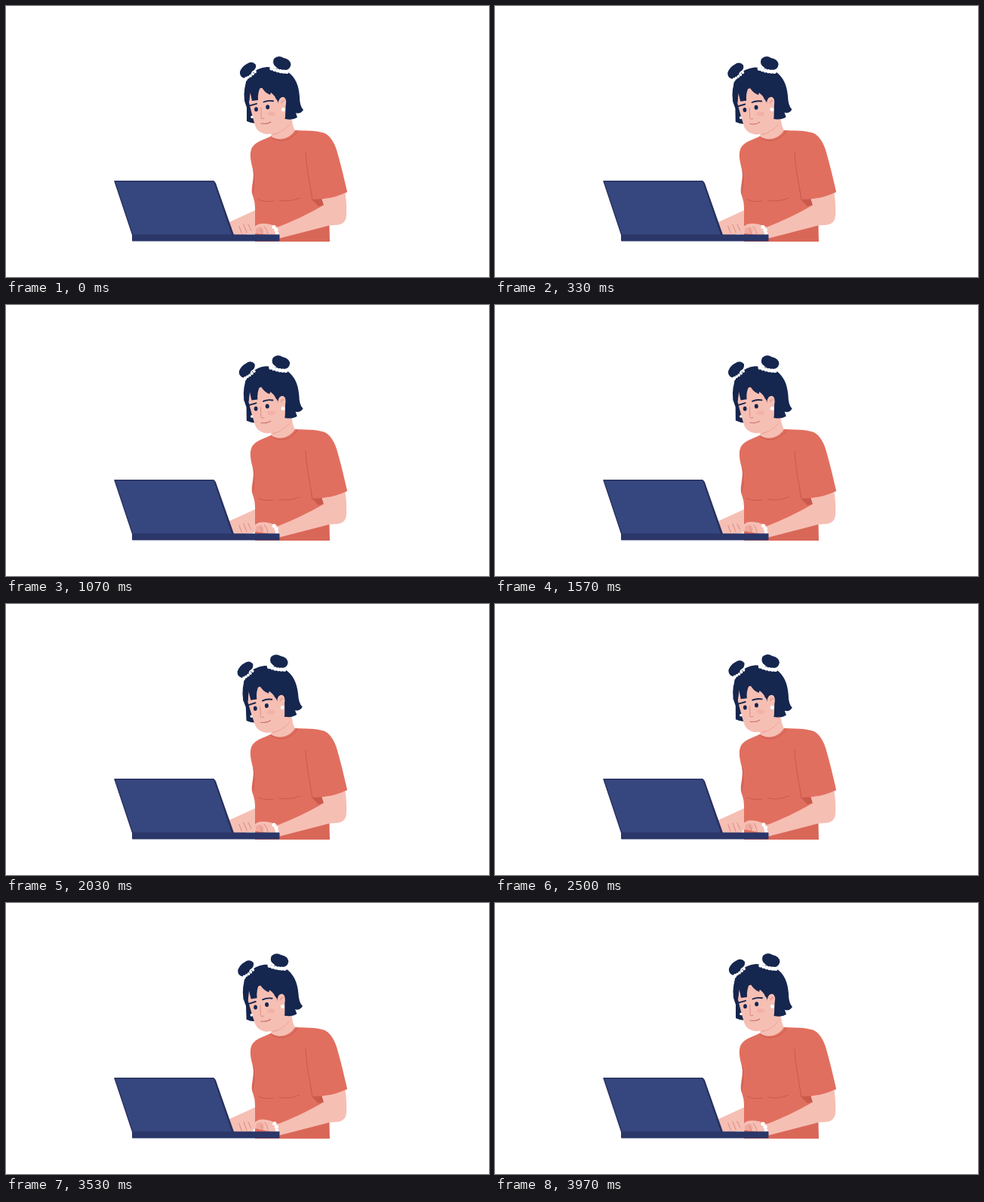
Write an HTML page that moves like this. It is 640 px wide and 360 px high and loops after 4.01 s.

```html
<!DOCTYPE html>
<html lang="en">
<head>
<meta charset="utf-8">
<title>Typing on a laptop</title>
<style>
  html, body { margin: 0; width: 100%; height: 100%; overflow: hidden; background: #fff; }
  svg { display: block; width: 100vw; height: 100vh; }
  .skin { fill: #f6bfb4; }
  .shade { fill: #eda398; }
  .hair { fill: #15264f; }
  .shirt { fill: #e16f5f; }
  .fold { fill: #c95a4c; }
  .white { fill: #fff; }
  .line { fill: none; stroke: #dc8d83; stroke-width: 1; stroke-linecap: round; stroke-linejoin: round; }
  .seam { fill: none; stroke: #c75b4e; stroke-width: 1; stroke-linecap: round; stroke-linejoin: round; }
  .brow { fill: none; stroke: #15264f; stroke-width: 1.9; stroke-linecap: round; }
</style>
</head>
<body>
<svg viewBox="0 0 640 360">
  <!-- far arm -->
  <path class="skin" d="M331 271 L296 287 L300 304 L318 304 L334 293 Z"/>

  <!-- neck and torso -->
  <path class="skin" d="M352 161 L351 174 Q366 186 384 167 Q379 160 378 143 Z"/>
  <path class="shade" d="M353 170 Q368 168 379 152 Q371 167 354 171.5 Z"/>
  <path class="shirt" d="M351 173 C343 177 331 180 326 188 C321 198 326 211 328 221 C328 234 324 243 326.5 251
    Q330 259 330 268 L330 313 L429 313 L428 285 L419 257 Q438 256 452 247 C448 228 443 208 438 191
    Q432 173 421 168.5 C409 165 396 166 383 165 C376 177 361 180 351 173 Z"/>
  <path class="fold" d="M362 308 L429 290 L429 313 L362 313 Z" opacity=".35"/>
  <path class="seam" d="M351 174 C361 183 379 179 386 166"/>
  <path class="seam" d="M334 257 Q343 261 354 259 M362 258 Q376 261 389 255 M328 218 Q330 235 327 248"/>
  <path class="fold" d="M402 232 L405 257 L414 266 L421 264 L418 256 Z"/>

  <!-- far hand -->
  <g id="farHand">
    <path class="skin" d="M299 288 Q313 282 322 288 L328 296 Q329 303 325 304 L300 304 Z"/>
    <path class="line" d="M309 293 L312 302 M315 291 L319 302 M321 291 L325 300"/>
  </g>

  <!-- near arm -->
  <path class="skin" d="M417 250 L449 246 Q452 262 451 279 Q450 291 436 291 Q427 291 419 294 L361 309
    L357 295 Q391 282 421 264.5 Z"/>
  <g id="hand">
    <path class="skin" d="M361 294 Q345 287 334 290 Q325 295 324 302 Q326 305 331 302 L347 304 L361 306 Z"/>
    <path class="shade" d="M331 296 Q337 291 340 295 Q343 299 340 303 L331 302 Z" opacity=".75"/>
    <path class="line" d="M337 296 L340 303 M342 293 Q346 297 347 303"/>
    <g class="white">
      <circle cx="355" cy="293.5" r="2.6"/>
      <circle cx="358" cy="297.5" r="2.7"/>
      <circle cx="359" cy="302" r="2.4"/>
    </g>
  </g>

  <!-- sleeve -->
  <path class="shirt" d="M405 257 Q433 257 452 247 L445 221 L402 232 Z"/>
  <path class="seam" d="M397 194 C398 216 403 238 406 257"/>

  <!-- laptop -->
  <path d="M144 232.7 H275 L277 235 L301 305 H168 Z" fill="#36477f" stroke="#29315f" stroke-width="1.4" stroke-linejoin="round"/>
  <path d="M275 233 L278 236 L302 304 H299 Z" fill="#29315f"/>
  <rect x="167" y="303.5" width="195.5" height="9" rx="1" fill="#2b3669"/>

  <!-- head -->
  <g id="head">
    <path class="hair" d="M346 81 Q333 82 324 91 Q316 101 315.5 117 L316 126 L319 135 L319 153 Q325 156 331 156
      L370 150 Q380 152 386 148 L384 142 Q390 144 394 138 Q389 133 389 120 C388 106 384 95 373 87 Q360 82 346 81 Z"/>
    <path class="skin" d="M324 112 L322 128 Q326 145 329 155 Q331 166 340 169 Q351 173 362 164 Q369 158 370 147 L371 122 L352 106 Z"/>
    <path class="hair" d="M318 100 L316 126 L322 127 L323.5 114 L326 126 L334 125 Q333 115 338 106 Q342 115 350 118
      L351 115 Q357 120 357.5 123 Q361 127 361 130 Q362 121 368 121 Q372 123 371 135 L378 116 L364 90 L336 88 Z"/>
    <path class="skin" d="M361 127 Q363 120 368 121 Q373 124 370 133 L367 140 L361 138 Z"/>
    <path class="line" d="M365 129 Q366 125 369 126"/>
    <ellipse cx="352" cy="143" rx="5.5" ry="3" fill="#f09e96" opacity=".4"/>
    <path class="brow" d="M323 132.3 L332 129.8 M341.5 127.5 Q347 125 354 126.3"/>
    <g class="hair">
      <ellipse cx="331.5" cy="137.3" rx="2.4" ry="3"/>
      <ellipse cx="346.7" cy="134.3" rx="2.5" ry="3"/>
    </g>
    <path class="line" d="M338 135 L338 148 Q339 151 342 149"/>
    <path d="M338 156 Q346 157.5 351 154" fill="none" stroke="#c56d68" stroke-width="1" stroke-linecap="round"/>
    <circle class="white" cx="367.5" cy="137.5" r="2.5"/>
    <circle class="white" cx="326" cy="147.5" r="1.8"/>

    <path class="hair" d="M355 70 Q361 64.5 368 69 Q377 71 377.5 78 Q376 86 368 85 Q362 86 358 81 Q352 77 355 70 Z"/>
    <path class="hair" d="M319 77 Q326 72 331 78 Q332 84 326 87 Q323 95 316 96 Q309 94 310 87 Q313 80 319 77 Z"/>
    <g id="ties" class="white"></g>
  </g>
</svg>
<script>
  const LOOP = 4010;
  const $ = id => document.getElementById(id);

  // scalloped hair ties
  function tie(x0, y0, x1, y1, count, r) {
    for (let i = 0; i < count; i++) {
      const k = i / (count - 1);
      const dot = document.createElementNS('http://www.w3.org/2000/svg', 'circle');
      dot.setAttribute('cx', x0 + (x1 - x0) * k);
      dot.setAttribute('cy', y0 + (y1 - y0) * k + Math.sin(k * Math.PI));
      dot.setAttribute('r', r);
      $('ties').append(dot);
    }
  }
  tie(352, 83, 372, 87.5, 6, 2.6);
  tie(318, 96, 330, 87.5, 5, 1.9);

  const turn = (id, deg, x, y) => $(id).setAttribute('transform', `rotate(${deg} ${x} ${y})`);

  // 0 -> 1 -> 0, repeated n times per loop
  const wave = (t, n) => (1 - Math.cos(2 * Math.PI * n * t / LOOP)) / 2;

  const start = performance.now();
  function draw() {
    const t = (performance.now() - start) % LOOP;
    const tap = wave(t, 12);
    turn('head', -2.5 * wave(t, 3), 365, 165);
    turn('hand', 5 * tap, 360, 303);
    turn('farHand', -3 * (1 - tap), 299, 296);
    requestAnimationFrame(draw);
  }
  draw();
</script>
</body>
</html>
```
